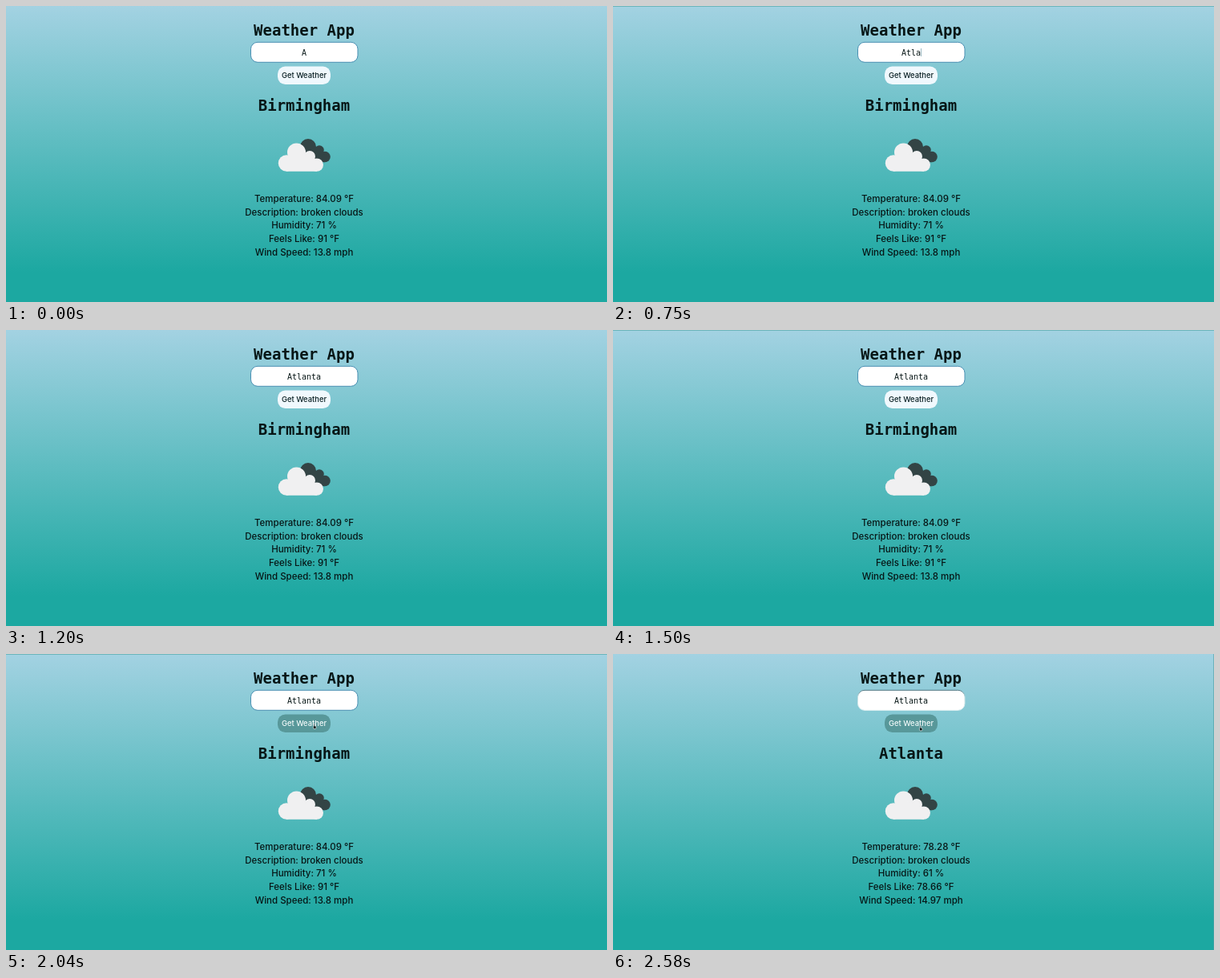
An HTML page for the animation above (2610 ms loop, 750 px wide and 370 px high).

```html
<!DOCTYPE html>
<html lang="en">
<head>
<meta charset="utf-8">
<title>Weather App</title>
<style>
  html, body { margin: 0; width: 100%; height: 100%; overflow: hidden; background: #1ca8a1; }
  svg { display: block; width: 750px; height: 370px; }
  text { text-anchor: middle; fill: #071616; }
  .head { font: bold 19px "DejaVu Sans Mono", monospace; }
  .typed { font: 10px "DejaVu Sans Mono", monospace; }
  .button { font: 500 9.4px Inter, sans-serif; }
  .facts { font: 500 11.5px Inter, sans-serif; }
</style>
</head>
<body>
<svg viewBox="0 0 750 370">
  <defs>
    <linearGradient id="sky" x1="0" y1="0" x2="0" y2="1">
      <stop offset="0" stop-color="#a3d2e2"/>
      <stop offset=".9" stop-color="#1ca8a1"/>
    </linearGradient>
    <linearGradient id="inset" x1="0" y1="0" x2="0" y2="1">
      <stop offset="0" stop-color="#4f7480"/>
      <stop offset=".3" stop-color="#c4dde0"/>
      <stop offset="1" stop-color="#e4f2f3"/>
    </linearGradient>
  </defs>
  <rect width="750" height="370" fill="url(#sky)"/>
  <rect id="edge" width="750" height="1" fill="#6cb6bb"/>
  <rect id="side" x="749" width="1" height="370" fill="#4d9fa3" opacity=".6"/>

  <text class="head" x="372" y="36.5">Weather App</text>

  <rect id="field" x="305.5" y="45.3" width="133.5" height="25" rx="8.5" fill="#fff"/>
  <text id="typed" class="typed" x="372" y="62"></text>
  <rect id="caret" y="53" width="1" height="10" fill="#9cb9c2"/>

  <rect id="button" x="339" y="75.5" width="66" height="22.5" rx="9.5"/>
  <text id="label" class="button" x="372" y="90"></text>

  <text id="city" class="head" x="372" y="131"></text>

  <g fill="#334445">
    <circle cx="377" cy="176" r="10"/>
    <circle cx="391" cy="180" r="5.8"/>
    <circle cx="398" cy="188.5" r="6.8"/>
    <path d="M377 176L391 176L398 187V195.3H377Z"/>
  </g>
  <g fill="#f0f0f1">
    <circle cx="362.5" cy="183" r="11.5"/>
    <circle cx="350" cy="196.5" r="10.2"/>
    <circle cx="379" cy="188" r="7"/>
    <circle cx="387.8" cy="198.6" r="8.2"/>
    <path d="M350 190L362 184L379 187L388 193V206.8H350Z"/>
  </g>

  <g id="facts" class="facts"></g>

  <path id="beam" d="M-1.5 -3.5H1.5M0 -3.5V3.5M-1.5 3.5H1.5" fill="none" stroke="#3c4c52"/>
  <path id="hand" d="M-1 -3.5L.1 -3.5V-.6L2 .4V2L1.3 3.4H-.9L-1.8 1.2L-1 .5Z"
        fill="#051010" stroke="#dfeaec" stroke-width=".7"/>
</svg>
<script>
const LOOP = 2610, WORD = "Atlanta", KEY = 190;
const HOVER = 1890, LOADED = 2100;
const $ = id => document.getElementById(id);

const report = (city, temp, humidity, feels, wind) => ({
  city,
  lines: [
    `Temperature: ${temp} °F`,
    "Description: broken clouds",
    `Humidity: ${humidity} %`,
    `Feels Like: ${feels} °F`,
    `Wind Speed: ${wind} mph`
  ]
});
const before = report("Birmingham", "84.09", 71, "91", "13.8");
const after = report(WORD, "78.28", 61, "78.66", "14.97");

const rows = before.lines.map((_, i) => {
  const row = document.createElementNS("http://www.w3.org/2000/svg", "text");
  row.setAttribute("x", 372);
  row.setAttribute("y", 244.7 + i * 16.8);
  return $("facts").appendChild(row);
});
$("label").textContent = "Get Weather";

// Pointer path: time, x, y
const path = [[1700, 383, 62], [1800, 383, 69], [1950, 385, 89], [2250, 385, 93], [2580, 384, 92.5]];

function pointerAt(t) {
  let i = 1;
  while (i < path.length - 1 && t > path[i][0]) i++;
  const [a, b] = [path[i - 1], path[i]];
  const k = Math.min(1, Math.max(0, (t - a[0]) / (b[0] - a[0])));
  return [1, 2].map(n => a[n] + (b[n] - a[n]) * k);
}

const show = (id, on) => $(id).setAttribute("visibility", on ? "visible" : "hidden");
const within = (t, from, to) => t >= from && t < to;

function setText(el, text) {
  if (el.textContent !== text) el.textContent = text;
}

function draw(t) {
  const count = Math.min(WORD.length, 1 + Math.floor(t / KEY));
  setText($("typed"), WORD.slice(0, count));
  $("caret").setAttribute("x", 372 + count * 3);
  show("caret", within(t, 570, 1140));
  show("edge", within(t, 240, 1170) || within(t, 1440, 2400));
  show("side", t >= 2400);

  const hover = t >= HOVER;
  $("button").setAttribute("fill", hover ? "#58989a" : "#f0f8fd");
  $("label").style.fill = hover ? "#f2fafa" : "#0a2024";
  $("field").setAttribute("stroke", t < LOADED ? "#4a8fb2" : "url(#inset)");

  const data = t < LOADED ? before : after;
  setText($("city"), data.city);
  rows.forEach((row, i) => setText(row, data.lines[i]));

  const [x, y] = pointerAt(t);
  for (const id of ["beam", "hand"]) $(id).setAttribute("transform", `translate(${x} ${y})`);
  show("beam", within(t, path[0][0], HOVER));
  show("hand", hover);
}

const start = performance.now();
function tick() {
  draw((performance.now() - start) % LOOP);
  requestAnimationFrame(tick);
}
tick();
</script>
</body>
</html>
```
